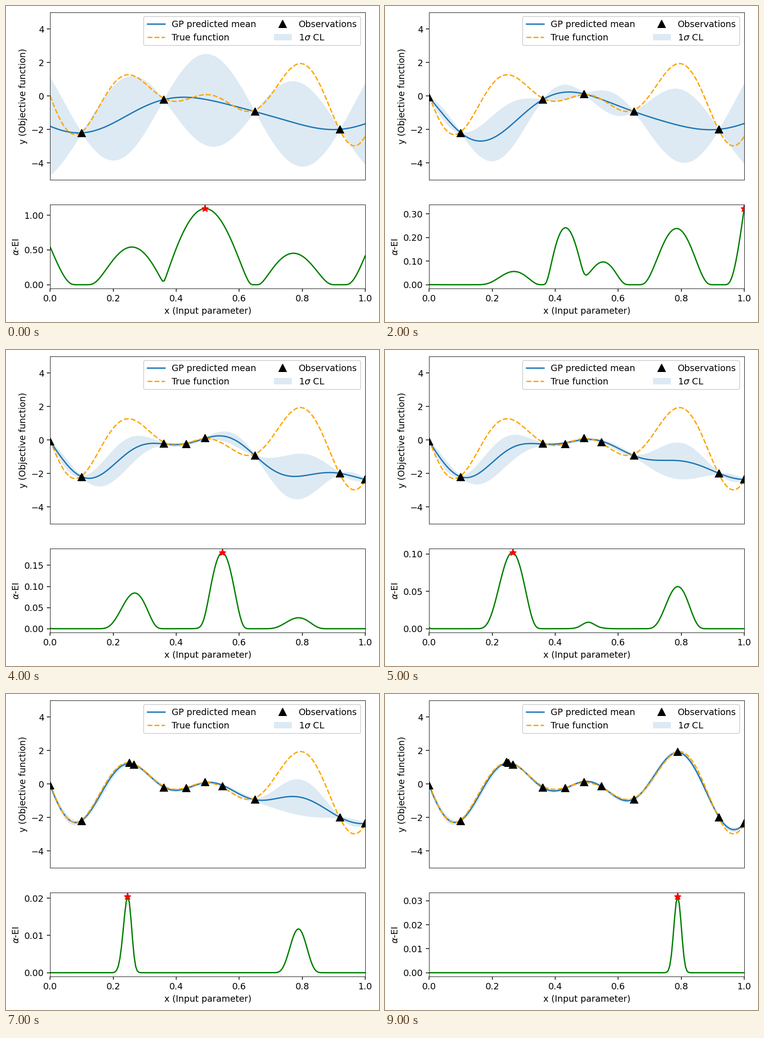
Animation of 813 by 689 pixels, one loop 10 s. Source, as a matplotlib script:

```python
import math

import numpy as np
import matplotlib.pyplot as plt
from matplotlib.animation import FuncAnimation

W, H, DPI = 813, 689, 138.4
STEPS = 10

# Gaussian process settings
AMP, SCALE, NOISE = 5.0, 0.15, 0.115
grid = np.linspace(0, 1, 200)

# four starting points, then one grid point per step
picks = [98, 0, 199, 86, 109, 53, 50, 49, 157, 157]
obs_x = np.r_[0.1, 0.36, 0.65, 0.92, grid[picks[:-1]]]
obs_y = np.array([-2.20, -0.215, -0.93, -1.99, 0.125, -0.085, -2.36,
                  -0.247, -0.12, 1.155, 1.26, 1.33, 1.92])


def objective(x):
    return (6 * x - 2.8) * np.sin(18 * x)


def kernel(a, b):
    return AMP**2 * np.exp(-0.5 * ((a[:, None] - b) / SCALE) ** 2)


def posterior(x, y):
    cov = kernel(x, x) + NOISE**2 * np.eye(len(x))
    cross = kernel(x, grid)
    gain = np.linalg.solve(cov, cross)
    var = AMP**2 - np.sum(cross * gain, axis=0)
    return gain.T @ y, np.sqrt(np.maximum(var, 1e-10))


def expected_improvement(mean, std, best):
    z = (mean - best) / std
    pdf = np.exp(-0.5 * z**2) / math.sqrt(2 * math.pi)
    cdf = np.array([0.5 * math.erfc(-v / math.sqrt(2)) for v in z])
    return np.maximum((mean - best) * cdf + std * pdf, 0)


def add_axes(left, top, width, height):
    return fig.add_axes([left / W, 1 - (top + height) / H,
                         width / W, height / H])


plt.rcParams["font.family"] = "DejaVu Sans"
plt.rcParams["axes.linewidth"] = 0.5
# the tiny margin keeps the pixel size from rounding down
fig = plt.figure(figsize=((W + 0.001) / DPI, (H + 0.001) / DPI), dpi=DPI,
                 facecolor="white")

top = add_axes(96.4, 13.8, 686.4, 365)
top.set(xlim=(0, 1), ylim=(-5, 5), xticks=[], yticks=[-4, -2, 0, 2, 4],
        ylabel="y (Objective function)")
band = top.fill_between(grid, grid, grid, color="tab:blue", alpha=0.15,
                        linewidth=0, label=r"1$\sigma$ CL")
mean_line, = top.plot([], [], color="tab:blue", label="GP predicted mean")
true_line, = top.plot(grid, objective(grid), "--", color="orange",
                      label="True function")
points, = top.plot([], [], "k^", markersize=8, label="Observations")
top.legend(handles=[mean_line, true_line, points, band], ncol=2,
           loc="upper right")

low = add_axes(96.4, 433.5, 686.4, 182.5)
low.set(xlim=(0, 1), xlabel="x (Input parameter)", ylabel=r"$\alpha$-EI")
low.yaxis.set_major_formatter(lambda v, pos: f"{v:.2f}")
ei_line, = low.plot([], [], color="green")
star, = low.plot([], [], "r*", markersize=8)


def draw(step):
    n = 4 + step
    x, y = obs_x[:n], obs_y[:n]
    mean, std = posterior(x, y)
    ei = expected_improvement(mean, std, y.max())

    mean_line.set_data(grid, mean)
    points.set_data(x, y)
    edge = np.r_[mean + std, (mean - std)[::-1]]
    band.set_verts([np.column_stack([np.r_[grid, grid[::-1]], edge])])

    ei_line.set_data(grid, ei)
    star.set_data([grid[picks[step]]], [ei[picks[step]]])
    low.set_ylim(-0.05 * ei.max(), 1.05 * ei.max())
    return mean_line, points, band, ei_line, star


anim = FuncAnimation(fig, draw, frames=STEPS, interval=1000,
                     init_func=lambda: draw(0), repeat=True, repeat_delay=0)
plt.show()
```
